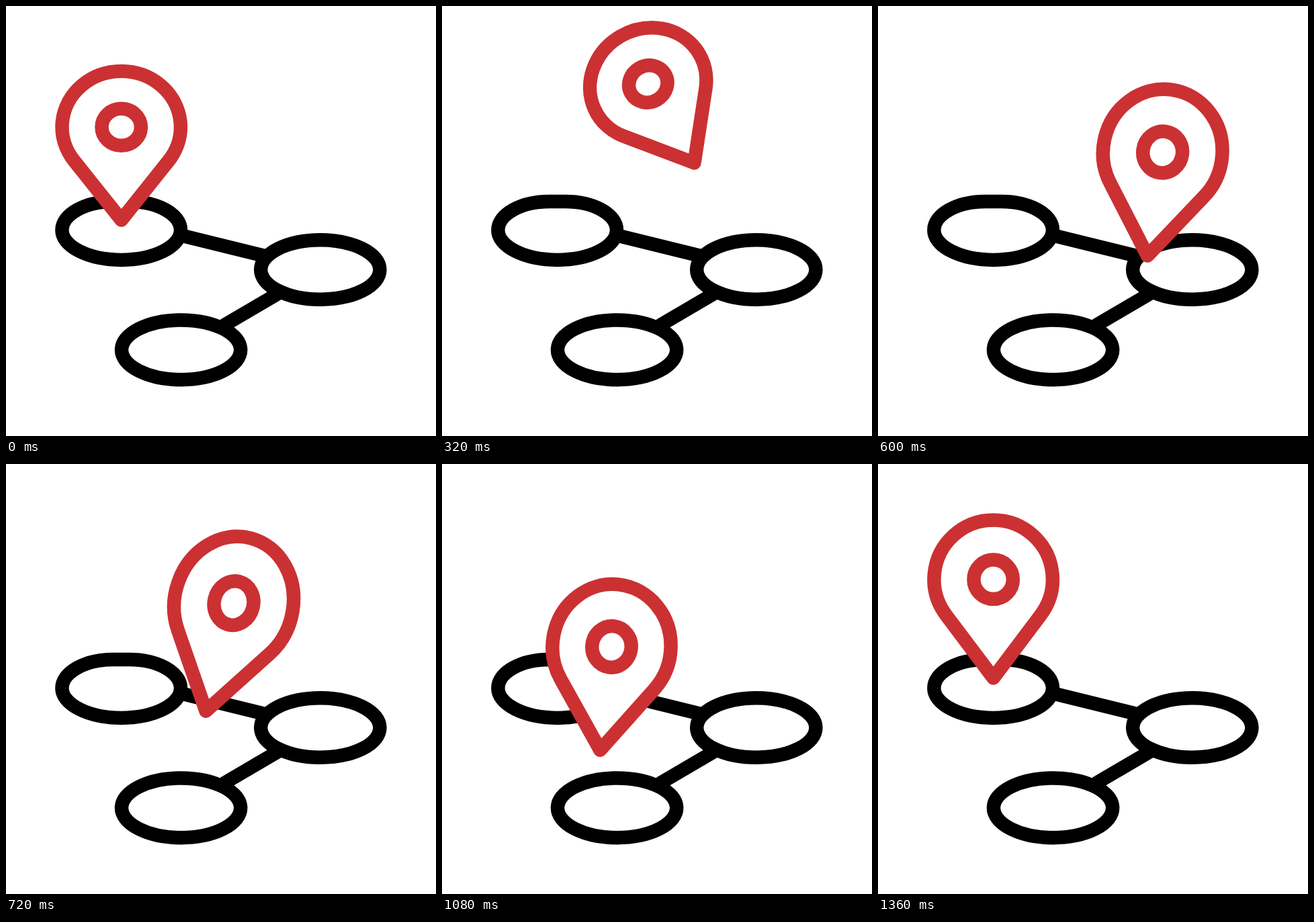
Animation of 640 by 640 pixels, one loop 1640 ms. Source, as an HTML page:

```html
<!DOCTYPE html>
<html lang="en">
<head>
<meta charset="utf-8">
<title>Route pin</title>
<style>
  html, body { margin: 0; width: 100%; height: 100%; overflow: hidden; background: #fff; }
  svg { display: block; width: 100vw; height: 100vh; }
  .route { fill: none; stroke: #000; stroke-width: 20.5; }
  #pin {
    fill: #fff; fill-rule: evenodd;
    stroke: #cb3132; stroke-width: 20.5; stroke-linejoin: round;
    vector-effect: non-scaling-stroke;
  }
</style>
</head>
<body>
<svg viewBox="0 0 640 640">
  <g class="route">
    <path d="M262 341.7L386 372.2M324 475.5L405 428"/>
    <path d="M160 291H183.5C226 291 260 310 260 333.7A88.3 44.2 0 0 1 83.4 333.7C83.4 310 117.5 291 160 291Z"/>
    <ellipse cx="467.8" cy="392.5" rx="88.6" ry="44.2"/>
    <ellipse cx="260.6" cy="511.8" rx="88.6" ry="44.4"/>
  </g>
  <path id="pin" d="M0 0L-70.4 -93.7A88.2 88.2 0 1 1 70.4 -93.7Z
    M-29.2 -146.7a29.2 29.2 0 1 0 58.4 0a29.2 29.2 0 1 0 -58.4 0Z"/>
</svg>
<script>
const LOOP = 1640, STEP = 40;
const HOME = { x: 171.7, y: 318.5 };

// Tip position, lean in degrees and stretch at each turning point
const poses = [
  { t: 0, ...HOME, lean: 0, stretch: .942 },
  { t: 80, ...HOME, lean: 0, stretch: .85 },
  { t: 320, x: 375.5, y: 233.5, lean: -30.3, stretch: .928 },
  { t: 510, x: 460, y: 368.2, lean: -1, stretch: .99 },
  { t: 720, x: 297.5, y: 367.7, lean: 14.5, stretch: 1.131 },
  { t: 940, x: 249, y: 487.3, lean: 1.6, stretch: 1.018 },
  { t: 1200, x: 221.5, y: 353.5, lean: 10.2, stretch: 1.09 },
  { t: 1360, ...HOME, lean: 0, stretch: 1 }
];

// Blending matrices morphs the outline along straight lines
const keys = poses.map(({ t, x, y, lean, stretch }) => {
  const a = lean * Math.PI / 180, c = Math.cos(a), s = Math.sin(a);
  return { t, m: [c, s, -s * stretch, c * stretch, x, y] };
});
const last = keys.length - 1;
const pin = document.getElementById('pin');

// Speed at a key; a value that rests before the key starts from zero
function slope(i, n) {
  if (i === 0 || i === last) return 0;
  const [a, k, b] = keys.slice(i - 1, i + 2);
  return a.m[n] === k.m[n] ? 0 : (b.m[n] - a.m[n]) / (b.t - a.t);
}

// Cubic Hermite through the keys
function matrixAt(t) {
  if (t >= keys[last].t) return keys[last].m;
  const i = keys.findIndex(k => k.t > t) - 1;
  const a = keys[i], b = keys[i + 1], d = b.t - a.t;
  const u = (t - a.t) / d, v = 1 - u;
  return a.m.map((p, n) =>
    p * v * v * (1 + 2 * u) + b.m[n] * u * u * (3 - 2 * u) +
    d * u * v * (v * slope(i, n) - u * slope(i + 1, n)));
}

const start = performance.now();
function tick() {
  const now = (performance.now() - start) % LOOP;
  pin.setAttribute('transform', `matrix(${matrixAt(Math.floor(now / STEP) * STEP)})`);
  requestAnimationFrame(tick);
}
tick();
</script>
</body>
</html>
```
